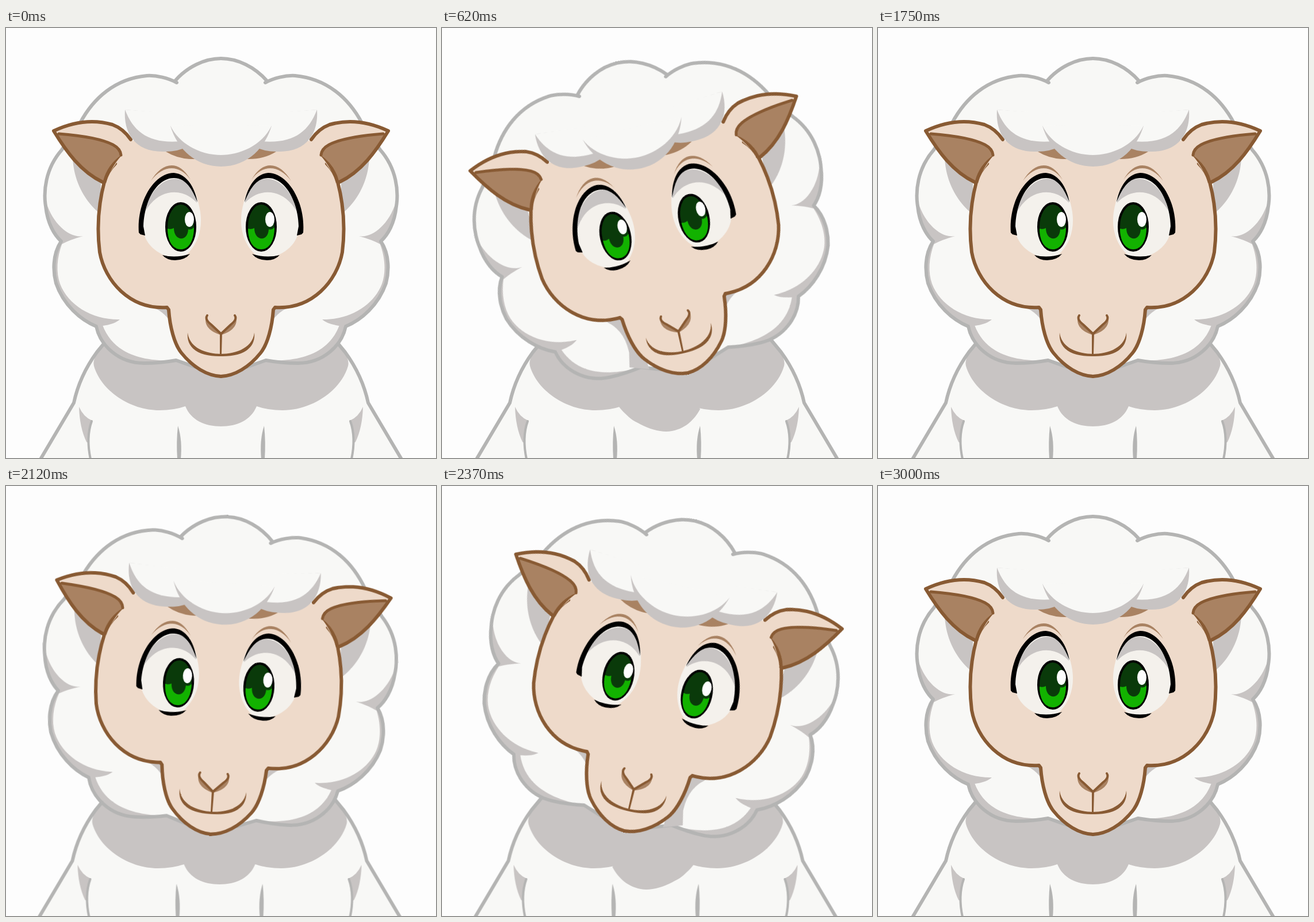
Animation of 748x748 px, one loop 3250 ms. Source, as an HTML page without scripts:

```html
<!DOCTYPE html>
<html lang="en">
<head>
<meta charset="utf-8">
<title>Sheep tilting its head</title>
<style>
  html, body { margin: 0; width: 100%; height: 100%; overflow: hidden; background: #fdfdfd; }
  svg { display: block; width: 100%; height: 100%; }

  .wool { fill: #f8f8f6; }
  .shade { fill: #c8c4c3; }
  .edge { fill: none; stroke: #b4b4b3; stroke-width: 6; }
  .skin { fill: #eedaca; }
  .line { fill: none; stroke: #885a33; stroke-width: 6; }
  .tan { fill: #a98262; }
  .brown { fill: #885a33; }
  .edge, .line { stroke-linecap: round; stroke-linejoin: round; }

  #body, #head, .open, .blink-l, .blink-r, .tilt-l, .tilt-r {
    animation: 3250ms step-end infinite;
  }
  #head { transform-origin: 374px 364px; animation-name: head; }
  #body { animation-name: body; }
  .open { animation-name: open; }
  .blink-l { animation-name: blink-l; }
  .blink-r { animation-name: blink-r; }
  .tilt-l { animation-name: tilt-l; }
  .tilt-r { animation-name: tilt-r; }

  @keyframes head {
    0%, 53.846%, 92.308%, 100% { transform: none; }
    11.385%, 49.846% { transform: translate(2px) rotate(-3.1deg); }
    15.077%, 46.154% { transform: translate(6px) rotate(-5.8deg); }
    19.077% { transform: rotate(-12.87deg); }
    65.231%, 88.308% { transform: translate(-5px) rotate(3.1deg); }
    68.923%, 84.615% { transform: translate(-8px) rotate(5.75deg); }
    72.923% { transform: translate(-3px) rotate(12.87deg); }
  }
  @keyframes body {
    0%, 92.308%, 100% { transform: none; }
    65.231% { transform: translate(-2.5px); }
  }
  @keyframes open {
    0%, 19.077%, 49.846%, 72.923%, 88.308%, 100% { visibility: visible; }
    15.077%, 46.154%, 68.923%, 84.615% { visibility: hidden; }
  }
  @keyframes blink-l {
    0%, 19.077%, 49.846%, 100% { visibility: hidden; }
    15.077%, 46.154% { visibility: visible; }
  }
  @keyframes blink-r {
    0%, 72.923%, 88.308%, 100% { visibility: hidden; }
    68.923%, 84.615% { visibility: visible; }
  }
  @keyframes tilt-l {
    0%, 46.154%, 100% { visibility: hidden; }
    19.077% { visibility: visible; }
  }
  @keyframes tilt-r {
    0%, 84.615%, 100% { visibility: hidden; }
    72.923% { visibility: visible; }
  }
</style>
</head>
<body>
<svg viewBox="0 0 748 748">
  <defs>
    <!-- Left halves; the right side is a mirror image about x = 374 -->
    <g id="torso">
      <path class="wool" d="M375 520H190L160 560Q128 605 118 652L59 752H375Z"/>
      <path class="shade" d="M375 530H180L163 562Q150 575 153 588C165 630 215 665 267 665Q292 665 312 658C322 682 345 693 375 693Z"/>
      <path class="edge" d="M186 530L158 564Q128 605 118 652L60 750"/>
      <path class="shade" d="M127 659Q135 677 150 683Q142 702 143 722L140 720Q128 695 127 659Z"/>
      <path class="edge" style="stroke-width:4" d="M149 684Q139 712 147 750"/>
      <path d="M299 692Q307 716 304 750H298Q296 720 299 692Z" fill="#b4b4b3"/>
    </g>

    <path id="dip" class="shade" d="M308 659C325 682 362 702 390 702C418 701 437 685 449 663L435 640H312Z"/>

    <g id="fleece">
      <path class="wool" d="M375 52C345 52 315 68 294 94C282 87 262 82 245 83C190 88 152 122 129 165L97 212C68 245 65 285 69 310C72 340 84 360 96 371C80 395 82 425 87 444C100 482 130 508 157 519C164 553 197 583 240 583C265 583 285 580 296 578L330 590H375Z"/>
      <path class="shade" d="M116 226C118 270 140 305 165 324V230Z"/>
      <path class="shade" d="M69 300C80 340 110 366 134 362Q112 368 97 376C80 352 70 330 69 300Z"/>
      <path class="shade" d="M96 374C82 400 84 430 89 445C105 490 135 510 158 519Q187 517 198 507C150 508 108 482 94 445C87 425 88 400 98 374Z"/>
      <path class="shade" d="M157 519C165 555 200 583 240 583L296 578C240 581 187 568 168 517Z"/>
      <path class="shade" d="M250 484Q273 490 290 516V484Z"/>
      <path class="edge" d="M374 53C345 53 315 68 294 92L297 95C282 87 262 82 245 83C190 88 152 122 129 165L97 212C68 245 65 285 69 310C72 340 84 360 96 371C80 395 82 425 87 444C100 482 130 508 157 519C164 553 197 583 240 583C265 583 285 580 296 578L330 590"/>
    </g>

    <path id="cheek" class="shade" d="M250 484Q283 505 282 549L277 574L310 585L300 495Z"/>

    <g id="face">
      <path class="skin" d="M375 200L224 194L201 222Q180 240 171 268C160 310 158 350 163 390C172 440 215 490 282 486C284 520 293 550 305 565C325 590 350 604 375 606Z"/>
      <path class="line" d="M190 236Q176 250 171 268C160 310 158 350 163 390C172 440 215 490 280 486L283 490C285 520 293 550 305 565C325 590 350 605 374 606"/>
      <path class="skin" d="M83 179C115 164 150 158 185 168Q204 175 218 195L230 200L201 222L168 269C130 250 105 215 83 179Z"/>
      <path class="tan" d="M88 183C130 187 165 192 188 204Q201 212 201 222Q182 240 171 268C130 250 105 215 88 183Z"/>
      <path class="line" style="stroke-width:5" d="M92 184C130 187 165 192 186 203Q199 210 200 221"/>
      <path class="brown" d="M202 220Q180 246 174 270L169 266Q176 238 202 220Z"/>
      <path class="line" d="M217 194Q204 175 185 168C150 158 115 164 83 179C105 215 130 250 168 268"/>
      <path class="tan" d="M278 215L310 204L330 228Q300 229 278 215Z"/>
    </g>

    <g id="fringe">
      <path class="shade" d="M207 142C204 182 224 215 272 215Q298 216 316 206L300 150Z"/>
      <path class="wool" d="M207 142C222 182 250 202 305 197L316 150Z"/>
      <path class="shade" d="M286 170C296 205 325 241 375 241V170Z"/>
      <path class="wool" d="M286 170C303 205 342 221 375 221V168Z"/>
    </g>

    <path id="brow" class="tan" d="M252 266C271 234 300 227 321 264C302 237 274 237 252 266Z"/>

    <g id="eye">
      <path fill="#f4f1ec" d="M237 345C239 290 265 257 292 257C322 260 333 290 338 320C343 355 330 385 305 401C275 402 245 382 240 357Z"/>
      <path class="shade" d="M243 318C253 260 318 235 332 304C306 276 265 280 243 318Z"/>
      <path d="M231 356C227 302 258 252 292 252C318 254 330 285 333 303C322 275 310 261 292 261C262 261 240 302 239 345L242 361L234 359Z"/>
      <path d="M272 395Q295 401 320 393Q311 404 294 404Q280 404 272 395Z"/>
    </g>

    <g id="iris">
      <ellipse cx="304" cy="346" rx="25" ry="41" fill="#0a3a0a" stroke="#000" stroke-width="4"/>
      <path fill="#12b200" d="M281 349Q287 351 292 348C292 371 316 373 317 350Q322 352 327 347C327 372 317 385 304 385C291 385 281 372 281 349Z"/>
      <ellipse cx="319" cy="333" rx="8" ry="13" fill="#fdfdfd"/>
    </g>

    <g id="shut">
      <path d="M236 365L246 361C270 377 305 379 335 369Q312 387 283 387Q261 386 247 376L242 372Z"/>
      <path d="M414 370C440 382 480 379 502 369L507 364L509 367L514 370L509 376C490 391 436 397 414 370Z"/>
      <path class="tan" d="M294 369Q314 368 327 360Q324 369 294 369Z"/>
      <path class="tan" d="M423 362Q440 371 466 371Q435 375 423 362Z"/>
    </g>

    <g id="snout">
      <path class="tan" d="M348 502C343 521 361 530 374 534L354 512Z"/>
      <path class="line" style="stroke-width:4" d="M350 500C346 506 351 511 357 516L374 532"/>
      <path class="brown" d="M316 530C319 556 347 567 375 567V571C342 572 313 561 316 530Z"/>
    </g>
  </defs>

  <g id="body">
    <use href="#torso"/>
    <use href="#torso" transform="matrix(-1 0 0 1 748 0)"/>
    <g class="tilt-l"><use href="#dip"/></g>
    <g class="tilt-r"><use href="#dip" transform="matrix(-1 0 0 1 748 0)"/></g>
  </g>

  <g id="head">
    <use href="#fleece"/>
    <use href="#fleece" transform="matrix(-1 0 0 1 748 0)"/>
    <g class="tilt-l"><use href="#cheek"/></g>
    <g class="tilt-r"><use href="#cheek" transform="matrix(-1 0 0 1 748 0)"/></g>
    <g class="blink-l"><use href="#cheek" x="9"/></g>
    <g class="blink-r"><use href="#cheek" x="9" transform="matrix(-1 0 0 1 748 0)"/></g>

    <use href="#face"/>
    <use href="#face" transform="matrix(-1 0 0 1 748 0)"/>
    <use href="#fringe"/>
    <use href="#fringe" transform="matrix(-1 0 0 1 748 0)"/>
    <use href="#brow"/>
    <use href="#brow" transform="matrix(-1 0 0 1 748 0)"/>

    <g class="open">
      <use href="#eye"/>
      <use href="#eye" transform="matrix(-1 0 0 1 748 0)"/>
      <use href="#iris"/>
      <use href="#iris" x="140"/>
    </g>
    <g class="blink-l"><use href="#shut"/></g>
    <g class="blink-r"><use href="#shut" transform="matrix(-1 0 0 1 748 0)"/></g>

    <use href="#snout"/>
    <use href="#snout" transform="matrix(-1 0 0 1 748 0)"/>
    <path class="brown" d="M372 530H376L375 567H372Z"/>
  </g>
</svg>
</body>
</html>
```
